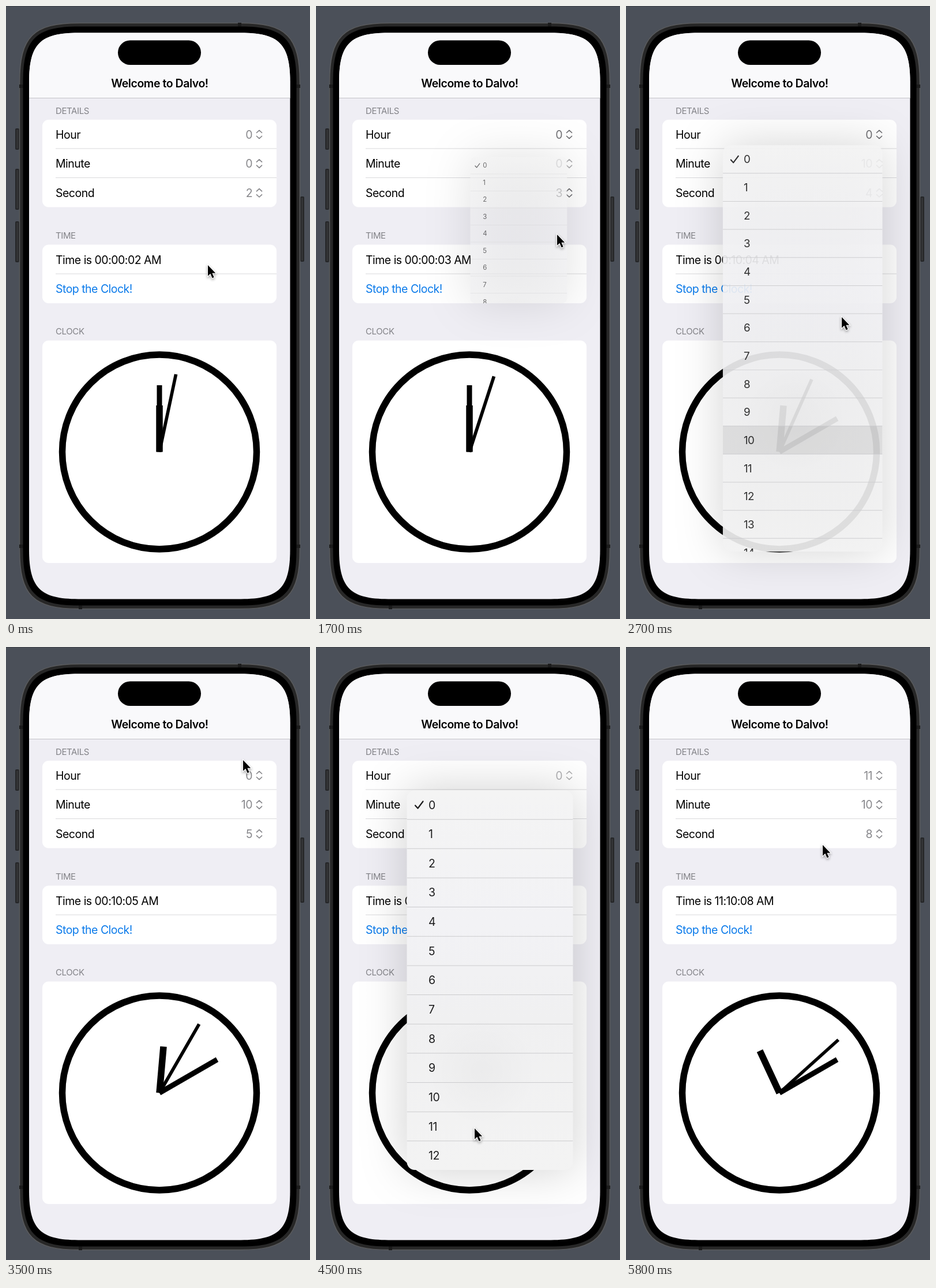
These frames come from a looping animation (527 px wide and 1062 px high, 5.9 s). An HTML page with a canvas:

```html
<!DOCTYPE html>
<html lang="en">
<head>
<meta charset="utf-8">
<title>Clock demo</title>
<style>
  html, body { margin: 0; width: 100%; height: 100%; overflow: hidden; background: #4b5059; }
  canvas { display: block; }
</style>
</head>
<body>
<canvas id="stage" width="527" height="1062"></canvas>
<script>
const ctx = document.getElementById('stage').getContext('2d');
const LOOP = 5900, STEP = 100, ROW = 50.65, MENU_W = 288;
const FAMILY = 'Inter, "Liberation Sans", sans-serif';

// time, x, y of the pointer tip
const POINTER = [
  [0, 350, 449], [100, 349, 403], [400, 349, 403], [900, 415, 262],
  [1200, 410, 254], [1500, 429, 274], [1600, 428, 310], [1700, 418, 396],
  [2100, 277, 651], [2400, 274, 750], [2600, 278, 745], [2700, 374, 539],
  [3100, 408, 260], [3500, 411, 196], [3600, 412, 189], [3800, 417, 214],
  [3900, 412, 290], [4200, 275, 834], [4500, 275, 834], [4600, 276, 832],
  [5000, 326, 480], [5500, 339, 345], [5700, 340, 345], [5800, 341, 343]
];
const TICKS = [900, 1900, 3200, 4100, 4700, 5300];
const MENUS = [
  { open: 1600, close: 2600, speed: 12, from: 273, top: 239, height: 751, rows: 15, pick: 10 },
  { open: 3800, close: 4600, speed: 14, from: 223, top: 248, height: 658, rows: 13, pick: 11 }
];

const lerp = (a, b, p) => a + (b - a) * p;
const pad = n => String(n).padStart(2, '0');

function pointerAt(t) {
  const i = POINTER.findIndex(k => k[0] > t);
  if (i < 0) return POINTER[POINTER.length - 1].slice(1);
  const a = POINTER[i - 1], b = POINTER[i], p = (t - a[0]) / (b[0] - a[0]);
  return [lerp(a[1], b[1], p), lerp(a[2], b[2], p)];
}

function menuPose(menu, t) {
  if (t < menu.open || t >= menu.close + 400) return { size: 0, alpha: 0 };
  if (t >= menu.close) {
    const u = (t - menu.close) / 400;
    return { size: 1 - u * u, alpha: Math.max(0, 1 - 1.4 * u * u) };
  }
  const w = (t - menu.open) / 1000 * menu.speed;
  const spring = 1 - (1 + w) * Math.exp(-w);
  const size = spring > 0.97 ? 1 : spring;
  return { size, alpha: Math.min(1, size * 1.9) };
}

function rect(x, y, w, h, r, fill) {
  ctx.beginPath();
  ctx.roundRect(x, y, w, h, r);
  ctx.fillStyle = fill;
  ctx.fill();
}

function line(points, width, color) {
  ctx.beginPath();
  points.forEach(([x, y]) => ctx.lineTo(x, y));
  ctx.lineWidth = width;
  ctx.strokeStyle = color;
  ctx.stroke();
}

function text(s, x, y, { size = 19.5, color = '#000', weight = 400, align = 'left', spacing = -0.52 } = {}) {
  ctx.font = `${weight} ${size}px ${FAMILY}`;
  ctx.letterSpacing = spacing + 'px';
  ctx.textAlign = align;
  ctx.fillStyle = color;
  ctx.fillText(s, x, y);
}

// Rounded rectangle with continuous-curvature corners.
function smoothRect(x, y, w, h, r) {
  const L = 1.4 * r, k = 0.315 * r, X = x + w, Y = y + h;
  ctx.beginPath();
  ctx.moveTo(x + L, y);
  ctx.lineTo(X - L, y);
  ctx.bezierCurveTo(X - k, y, X, y + k, X, y + L);
  ctx.lineTo(X, Y - L);
  ctx.bezierCurveTo(X, Y - k, X - k, Y, X - L, Y);
  ctx.lineTo(x + L, Y);
  ctx.bezierCurveTo(x + k, Y, x, Y - k, x, Y - L);
  ctx.lineTo(x, y + L);
  ctx.bezierCurveTo(x, y + k, x + k, y, x + L, y);
  ctx.closePath();
}

function drawPhone() {
  rect(0, 0, 527, 1062, 0, '#4b5059');
  rect(0, 0, 527, 1, 0, '#3c4047');
  for (const [x, y, h] of [[16, 212, 37], [16, 282, 71], [16, 373, 71], [510, 330, 113]]) {
    rect(x, y, 7, h, 2, '#252628');
    rect(x + 2, y + 2, 3, h - 4, 1, '#333436');
  }
  smoothRect(23.5, 29.5, 486, 1015, 74);
  ctx.fillStyle = '#272727';
  ctx.fill();
  ctx.lineWidth = 1.5;
  ctx.strokeStyle = '#5a5b5d';
  ctx.stroke();
  for (const [x, y, w, h] of [[402, 29, 6, 7], [126, 1038, 6, 7], [23, 136, 7, 6], [503, 136, 7, 6], [23, 933, 7, 6], [503, 933, 7, 6]])
    rect(x, y, w, h, 0, '#1b1b1b');
  smoothRect(29.5, 35.5, 474, 1003, 69);
  ctx.fillStyle = '#000';
  ctx.fill();
}

function drawValue(value, y, color, alpha) {
  ctx.globalAlpha = alpha;
  text(value, 427, y + 7, { color, align: 'right' });
  ctx.lineCap = ctx.lineJoin = 'round';
  for (const d of [-1, 1])
    line([[434.5, y + d * 3], [439, y + d * 7.2], [443.5, y + d * 3]], 1.7, color);
  ctx.lineCap = 'butt';
  ctx.lineJoin = 'miter';
  ctx.globalAlpha = 1;
}

function hand(turn, length, width) {
  const a = turn * 2 * Math.PI;
  line([[266, 772.5], [266 + length * Math.sin(a), 772.5 - length * Math.cos(a)]], width, '#000');
}

function drawForm(t, hour, minute, second, menuOpen) {
  rect(40, 46, 453, 982, 0, '#efeef4');
  for (const [y, h] of [[197, 151.5], [413.5, 101.5], [579.5, 385.5]])
    rect(63, y, 406, h, 11, '#fff');
  for (const y of [246.5, 297, 463.5]) rect(86, y, 383, 1, 0, '#d9d9dc');

  const caption = { size: 15, color: '#828287', spacing: -0.38 };
  text('DETAILS', 86, 186.5, caption);
  text('TIME', 86, 403, caption);
  text('CLOCK', 86, 569, caption);

  const gray = menuOpen ? '#6e6e72' : '#87878b';
  const pressed = [t >= 3800 && t < 4600, t >= 1500 && t < 2600, false];
  ['Hour', 'Minute', 'Second'].forEach((name, i) => {
    const y = 222.5 + i * ROW;
    text(name, 86, y + 7, {});
    drawValue([hour, minute, second][i], y, gray, pressed[i] ? 0.55 : 1);
  });
  text(`Time is ${pad(hour)}:${pad(minute)}:${pad(second)} AM`, 86, 446.5);
  text('Stop the Clock!', 86, 497, { color: '#0a7aea' });

  ctx.beginPath();
  ctx.arc(266, 772.5, 168.5, 0, 2 * Math.PI);
  ctx.lineWidth = 11.5;
  ctx.strokeStyle = '#000';
  ctx.stroke();
  hand((hour + minute / 60) / 12, 80.5, 11.5);
  hand(minute / 60, 115.5, 9);
  hand(second / 60, 137.5, 5.7);
}

function drawMenu(menu, t, { size, alpha }) {
  if (alpha <= 0) return;
  const scale = lerp(0.37, 1, size), right = lerp(430, 445.5, size);
  const h = menu.height * size / scale;
  ctx.save();
  ctx.beginPath();
  ctx.rect(40, 160, 453, 880);
  ctx.clip();
  ctx.translate(right - MENU_W * scale, lerp(menu.from, menu.top, size));
  ctx.scale(scale, scale);
  ctx.globalAlpha = alpha;

  const shade = ctx.createLinearGradient(0, 0, 0, menu.height);
  shade.addColorStop(0, '#f4f4f4');
  shade.addColorStop(0.35, '#f2f2f5');
  shade.addColorStop(0.6, '#f0f0f1');
  shade.addColorStop(1, '#f3f3f3');
  ctx.shadowColor = 'rgba(0,0,0,.19)';
  ctx.shadowBlur = 80;
  rect(0, 0, MENU_W, h, 14, shade);
  ctx.shadowColor = 'transparent';
  ctx.clip();

  const cy = 735 - menu.top;
  const smudge = ctx.createRadialGradient(130, cy, 0, 130, cy, 95);
  smudge.addColorStop(0, 'rgba(0,0,0,.025)');
  smudge.addColorStop(1, 'rgba(0,0,0,0)');
  rect(0, 0, MENU_W, h, 0, smudge);

  if (t >= menu.close) rect(0, menu.pick * ROW, MENU_W, ROW, 0, 'rgba(0,0,0,.085)');
  for (let i = 0; i < menu.rows; i++) {
    const y = i * ROW + 25.5;
    if (i) rect(0, i * ROW - 0.5, MENU_W, 1, 0, '#cbcbcd');
    text(i, 37.5, y + 7, { color: '#1c1c1d' });
  }
  ctx.lineCap = ctx.lineJoin = 'round';
  line([[14.5, 26.5], [19, 31.5], [28, 19.5]], 2.2, '#1c1c1d');
  ctx.restore();
}

function drawHeader() {
  rect(40, 46, 453, 113, 0, '#f9f9fb');
  rect(40, 159, 453, 1, 0, '#c3c3c7');
  rect(194, 59.5, 144, 42.5, 21.25, '#000');
  text('Welcome to Dalvo!', 266.5, 140.5, { weight: 600, align: 'center', spacing: -0.45 });
}

function drawPointer([x, y]) {
  ctx.save();
  ctx.translate(x, y);
  ctx.scale(1.14, 1.14);
  ctx.beginPath();
  for (const p of [[0, 0], [0, 16.5], [3.8, 13], [6.6, 19.6], [9.3, 18.4], [6.5, 12], [11.6, 12]])
    ctx.lineTo(...p);
  ctx.closePath();
  ctx.shadowColor = 'rgba(0,0,0,.4)';
  ctx.shadowBlur = 4;
  ctx.shadowOffsetY = 2;
  ctx.lineWidth = 2;
  ctx.strokeStyle = '#fff';
  ctx.stroke();
  ctx.shadowColor = 'transparent';
  ctx.fillStyle = '#000';
  ctx.fill();
  ctx.restore();
}

function draw(t) {
  const second = 2 + TICKS.filter(k => t >= k).length;
  const minute = t >= MENUS[0].close ? 10 : 0;
  const hour = t >= MENUS[1].close ? 11 : 0;
  const poses = MENUS.map(m => menuPose(m, t));

  drawPhone();
  ctx.save();
  smoothRect(40, 46.5, 452.5, 981, 61);
  ctx.clip();
  drawForm(t, hour, minute, second, poses.some(p => p.alpha > 0));
  MENUS.forEach((m, i) => drawMenu(m, t, poses[i]));
  drawHeader();
  ctx.restore();
  drawPointer(pointerAt(t));
}

const start = performance.now();
function tick() {
  const t = Math.max(0, performance.now() - start) % LOOP;
  draw(Math.floor(t / STEP) * STEP);
  requestAnimationFrame(tick);
}
tick();
</script>
</body>
</html>
```
